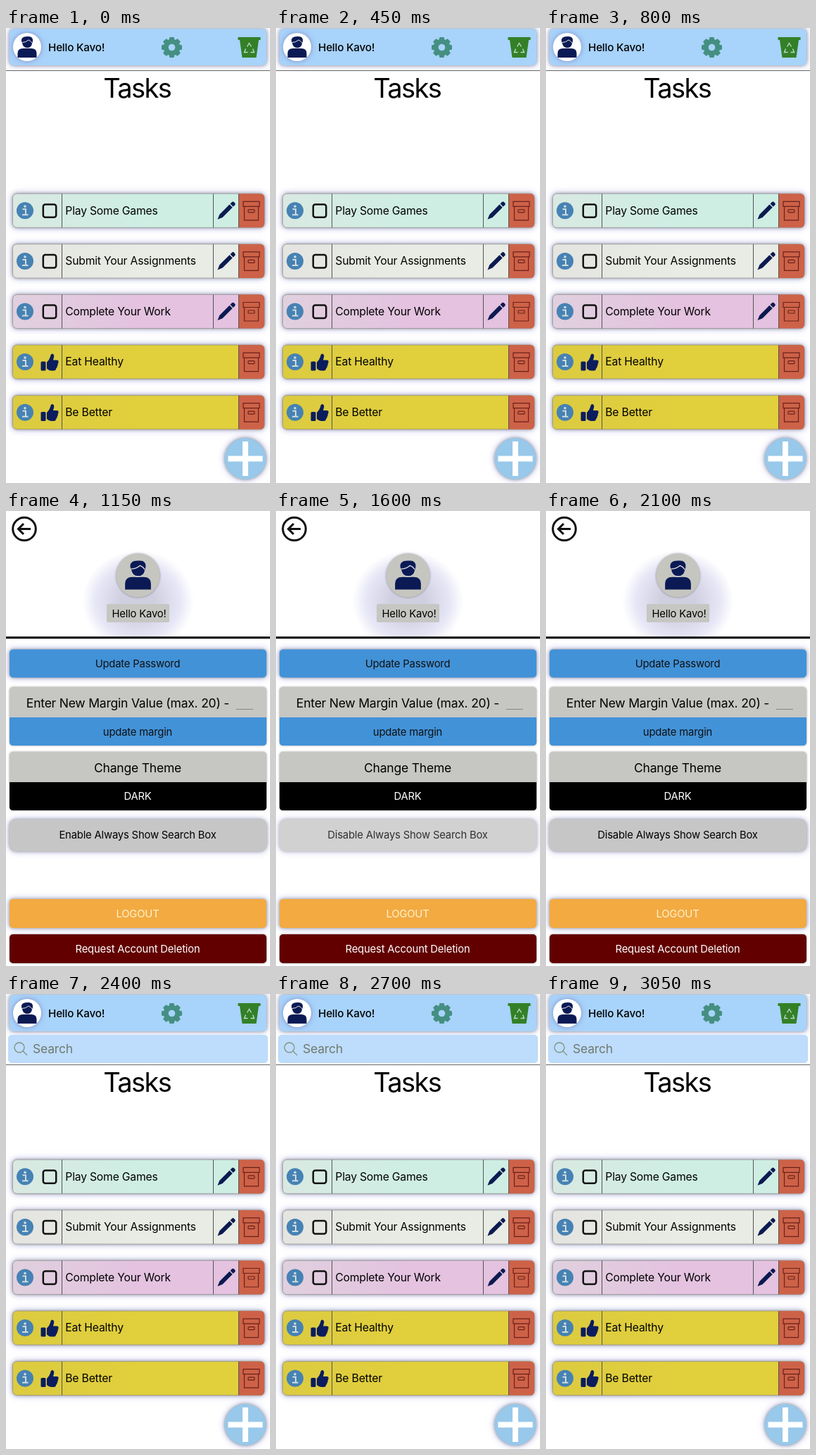
These frames come from a looping animation (375 px wide and 646 px high, 3100 ms). An HTML page:

```html
<!DOCTYPE html>
<html lang="en">
<head>
<meta charset="utf-8">
<title>Task list</title>
<style>
html, body { margin: 0; width: 100%; height: 100%; overflow: hidden; background: #fff; }
svg { display: block; width: 100%; height: 100%; }
text { font: 14.8px Inter, Roboto, sans-serif; letter-spacing: -.012em; }
.mid { text-anchor: middle; }
.row { font-size: 15.7px; }
.big { font-size: 17.5px; }
.soft { filter: drop-shadow(0 0 2px #7776) drop-shadow(0 0 4px #8087d888); }
.glow { filter: drop-shadow(0 0 2px #77704c99) drop-shadow(0 0 5px #8087d899); }
.thin { filter: drop-shadow(0 0 1.5px #0006); }
</style>
</head>
<body>
<svg viewBox="0 0 375 646" xmlns="http://www.w3.org/2000/svg">
  <defs>
    <radialGradient id="halo">
      <stop offset=".3" stop-color="#cfcfe0"/>
      <stop offset=".75" stop-color="#e6e6f6"/>
      <stop offset="1" stop-color="#fff"/>
    </radialGradient>
    <g id="person" fill="#0b1a55">
      <path d="M-13.5 15V9Q-13.5 2-6 2H6Q13.5 2 13.5 9V15Z"/>
      <ellipse cy="-6" rx="7" ry="8" fill="#d5d8df"/>
      <path d="M-8-8Q-9-15 0-15Q9-16 8-8L7-5Q5-9 2-10Q-2-6-7-6Z"/>
      <path d="M-7-6Q-2-6 2-10Q6-8 7-5Q6 1 0 1Q-6 1-7-6Z"/>
      <path d="M-7-6.5Q-2-6.5 2-10Q5-9 7-6" fill="none" stroke="#d5d8df"/>
    </g>
    <g id="info">
      <circle r="12" fill="#4682b4"/>
      <path d="M-3.5-2H1V6M-4 6H4.5" fill="none" stroke="#cfdcdc" stroke-width="2"/>
      <circle cy="-6" r="1.8" fill="#cfdcdc"/>
    </g>
    <rect id="box" x="-9.2" y="-9.2" width="18.4" height="18.4" rx="3" fill="none" stroke="#111" stroke-width="2.5"/>
    <g id="thumb" fill="#0b1d5e">
      <rect x="-12.5" y="-1" width="7" height="13" rx="1.5"/>
      <path d="M-4 0Q0-4 1-8Q1.5-12 4-12Q7-11 6-7L5-3H10Q13-3 12.5 0Q12 2 11.5 3Q12 5 10.5 6Q11 8 9 9Q9 12 6 12H2Q-1 12-4 9Z"/>
    </g>
    <g id="pencil" fill="#0b1a50" transform="rotate(45)">
      <path d="M-3-10H3V10L0 17L-3 10ZM-3-11.5V-15Q-3-17 0-17Q3-17 3-15V-11.5Z"/>
    </g>
    <g id="archive" fill="none" stroke="#6b2119" stroke-width="1.2">
      <path d="M-11.5-13.5H11.5V-6.5H-11.5ZM-10-6.5V13H10V-6.5"/>
      <rect x="-4.5" y="-2" width="9" height="4" rx="1"/>
    </g>
  </defs>

  <g id="tasks">
    <rect class="glow" x="5" y="1" width="365" height="52" rx="6" fill="#a8d3fa"/>
    <circle class="soft" cx="30" cy="27" r="20" fill="#fff"/>
    <use href="#person" x="30" y="27"/>
    <text x="60" y="32.5" style="font-size:15.2px;font-weight:500">Hello Kavo!</text>
    <g id="gear" transform="translate(235.5 27.5)" fill="#458f82"></g>
    <g transform="translate(345.5 27.5)">
      <path d="M-16-14.5H16V-10.5H13.5L10 14.5H-10L-13.5-10.5H-16Z" fill="#338027"/>
      <path d="M-3-1L0-6L3-1M5 2L7 7H2M-2 7H-7L-5 2" fill="none" stroke="#b9d8c8" stroke-width="1.4"/>
    </g>
    <g id="search">
      <rect x="3" y="58" width="369" height="40" rx="5" fill="#bedcfb"/>
      <g fill="none" stroke="#7d9482" stroke-width="1.3">
        <circle cx="19" cy="76" r="7"/><path d="M24 81L30 87"/>
      </g>
      <text class="big" x="38" y="83.5" fill="#6f7a70">Search</text>
    </g>
    <g id="title">
      <path d="M0 60.5H375" stroke="#666"/>
      <text class="mid" x="186.2" y="99.3" style="font-size:38px;letter-spacing:-1.6px">Tasks</text>
    </g>
    <g id="rows"></g>
    <circle class="glow" cx="340" cy="611.5" r="29.5" fill="#98c8ea"/>
    <path d="M315.5 611.5H364.5M340 587V636" stroke="#fff" stroke-width="8"/>
  </g>

  <g id="settings">
    <g fill="none" stroke="#111" stroke-width="3">
      <circle cx="26" cy="25.5" r="16.3"/>
      <path d="M35 25.5H18M25 18L17.5 25.5L25 33"/>
    </g>
    <ellipse cx="187.5" cy="128" rx="79" ry="72" fill="url(#halo)"/>
    <rect y="179" width="375" height="467" fill="#fff"/>
    <circle class="thin" cx="187.5" cy="91.5" r="31" fill="#c6c6c0"/>
    <use href="#person" transform="translate(187.5 91) scale(1.36)"/>
    <rect x="143" y="132" width="89" height="26" rx="2" fill="#c6c6c3"/>
    <text class="mid" x="189" y="151">Hello Kavo!</text>
    <path d="M0 179.8H375" stroke="#000" stroke-width="3"/>
    <g id="panels"></g>
    <path d="M327 281.5H351" stroke="#888"/>
    <g id="toggle" class="glow">
      <rect x="5" y="438" width="365" height="45" rx="9" fill="#c6c6c6"/>
      <text id="toggleText" class="mid" x="187" y="465"></text>
    </g>
  </g>
</svg>
<script>
const $ = id => document.getElementById(id);
const LOOP = 3100, OPEN = 850, PRESS = 1300, FLIP = 1450, CLOSE = 2300;

let gear = '<circle r="11.5"/>';
for (let a = 0; a < 360; a += 45)
  gear += `<path d="M-4.2-10L-3-14.5H3L4.2-10Z" transform="rotate(${a})"/>`;
$('gear').innerHTML = gear + '<circle r="4.8" fill="#a8d3fa"/>';

// each row fades from its left colour to its right one
const tasks = [
  ['Play Some Games', '#d9e9e2', '#ceeee4'],
  ['Submit Your Assignments', '#e4e4e0', '#e8ece4'],
  ['Complete Your Work', '#e0d0de', '#e4c2e0'],
  ['Eat Healthy', '#dccb40', '#e1cf3c', true],
  ['Be Better', '#dccb40', '#e1cf3c', true]
];
$('rows').innerHTML = tasks.map(([name, left, right, done], i) => `
  <linearGradient id="fill${i}">
    <stop stop-color="${left}"/><stop offset=".5" stop-color="${right}"/>
  </linearGradient>
  <g transform="translate(0 ${235.3 + 71.6 * i})">
    <rect class="glow" x="9.5" width="357.5" height="48" rx="6" fill="url(#fill${i})" stroke="#7779" stroke-width=".8"/>
    <path d="M331 0H361Q367 0 367 6V42Q367 48 361 48H331Z" fill="#cd6248"/>
    <path d="M79.5 0V48${done ? '' : 'M294.5 0V48'}M330.5 0V48" stroke="#555"/>
    <use href="#info" x="27" y="24"/>
    <use href="#${done ? 'thumb' : 'box'}" x="62" y="24.3"/>
    <text class="row" x="84.3" y="29.3">${name}</text>
    ${done ? '' : '<use href="#pencil" x="312.5" y="24.5"/>'}
    <use href="#archive" x="348.5" y="24.5"/>
  </g>`).join('');

const panel = (y, h, fill, cls) =>
  `<rect class="${cls}" x="5" y="${y}" width="365" height="${h}" rx="5" fill="${fill}"/>`;
const label = (s, y, fill = '#111', cls = '', x = 187) =>
  `<text class="mid ${cls}" x="${x}" y="${y}" fill="${fill}">${s}</text>`;
const lower = (y, h, fill) =>
  `<path d="M5 ${y}H370v${h - 5}q0 5-5 5H10q-5 0-5-5Z" fill="${fill}"/>`;
const gray = '#c6c6c3', blue = '#4292d8';
$('panels').innerHTML =
  panel(196.5, 40, blue, 'glow') + label('Update Password', 222) +
  panel(250, 83, gray, 'thin') + lower(293, 40, blue) +
  label('Enter New Margin Value (max. 20) -', 279, '#000', 'big', 173) +
  label('update margin', 318.5) +
  panel(342, 83, gray, 'thin') + lower(385, 40, '#000') +
  label('Change Theme', 370.5, '#000', 'big') + label('DARK', 410, '#fff') +
  panel(551, 41, '#f3aa41', 'glow') + label('LOGOUT', 577, '#fff3d0') +
  panel(601, 41, '#620000', 'thin') + label('Request Account Deletion', 627, '#fff');

const ramp = (t, a, b) => Math.min(1, Math.max(0, (t - a) / (b - a)));
const show = (id, on) => $(id).setAttribute('display', on ? 'inline' : 'none');
const start = performance.now();

function draw(now) {
  const t = Math.max(0, now - start) % LOOP;
  const inSettings = t >= OPEN && t < CLOSE, flipped = t >= FLIP;
  show('settings', inSettings);
  show('tasks', !inSettings);
  show('search', flipped);
  $('title').setAttribute('transform', `translate(0 ${flipped ? 40 : 0})`);
  $('toggleText').textContent = (flipped ? 'Disable' : 'Enable') + ' Always Show Search Box';
  // the button dims when pressed and recovers after release
  const dim = flipped ? 1 - ramp(t, FLIP, FLIP + 250) : ramp(t, PRESS, FLIP);
  $('toggle').setAttribute('opacity', 1 - .5 * dim);
  requestAnimationFrame(draw);
}
draw(start);
</script>
</body>
</html>
```
